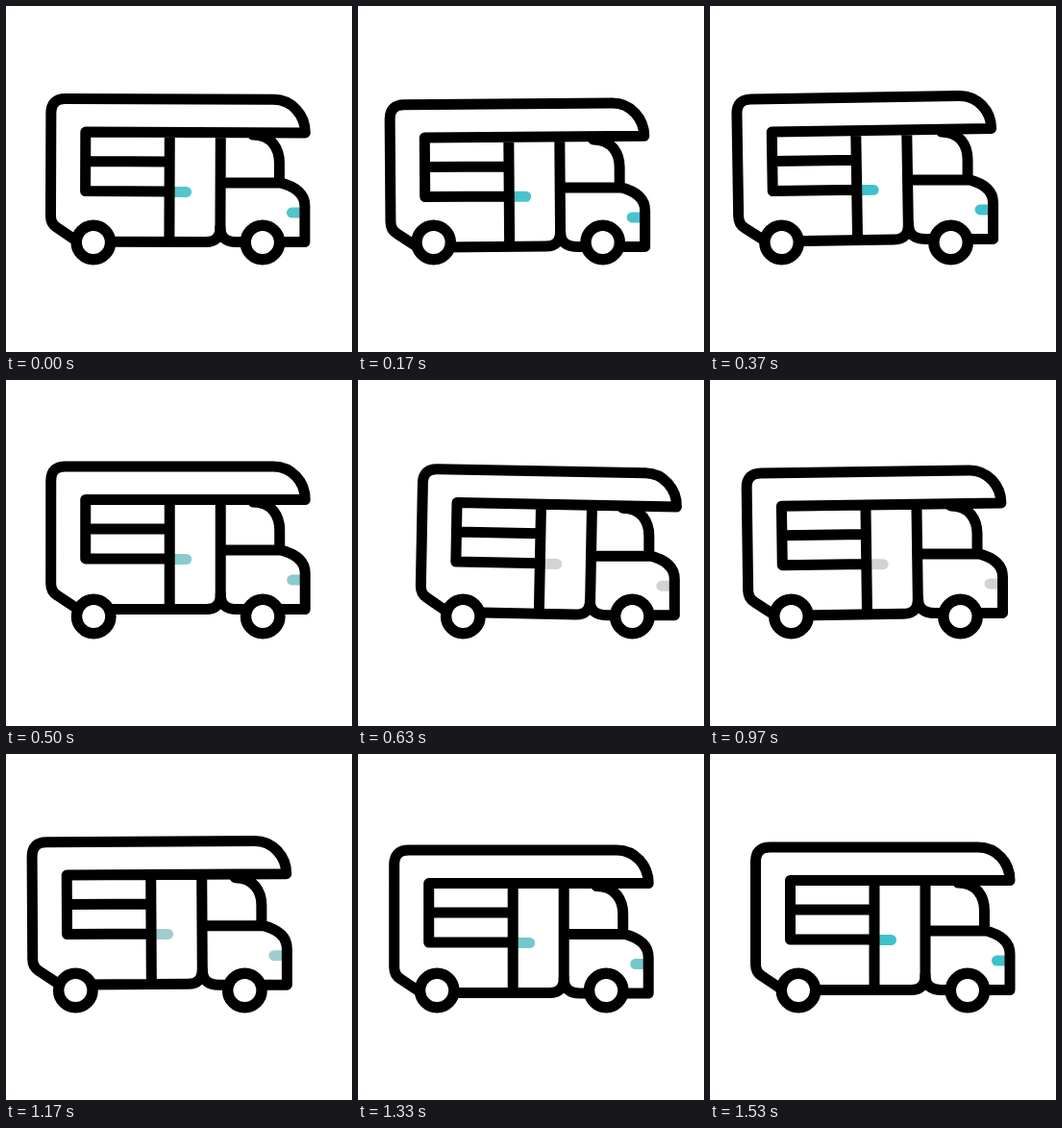
Write an HTML page that moves like this. It is 360 px wide and 360 px high and loops after 1.67 s.

```html
<!DOCTYPE html>
<html>
<head>
<meta charset="utf-8">
<style>
  html, body { margin: 0; height: 100%; overflow: hidden; background: #fff; }
  svg { display: block; width: 100%; height: 100%; }
  .line { fill: none; stroke: #000; stroke-width: 11; stroke-linecap: round; stroke-linejoin: round; }
  .lamp { fill: none; stroke-width: 11; stroke-linecap: round; }
  .wheel { fill: #fff; stroke: #000; stroke-width: 11.5; }
</style>
</head>
<body>
<svg viewBox="0 0 360 360">
  <g id="cab">
    <path class="lamp" d="M298.5 215H306"/>
    <path class="line" d="M258 134C278 134 285.5 149 285.5 163V183.500C300 187 312 194 312 208V245.500H241Q224 245.500 224 230M226 184H287"/>
  </g>
  <g id="body">
    <path class="lamp" d="M177 193.500H188.500"/>
    <path class="line" d="M72 243L54 231Q47.500 227 47.500 219V112Q47.500 97 62.500 97H279C298 97 312 113 312 131.500H83.500V193H171M84 162H171M171 132V245.500M100 245.500H209Q224 245.500 224 230V132"/>
  </g>
  <g id="wheels">
    <circle class="wheel" cx="92" cy="246" r="17.700"/>
    <circle class="wheel" cx="268" cy="246" r="17.700"/>
  </g>
</svg>
<script>
const LOOP = 1670, CAB_LEAD = 15;

// Keys are [time in ms, value].
const sway = [[-50, 0], [310, -20], [715, 22], [1120, -20.5], [1530, 0]];
const bounce = [[0, 0], [200, 5], [500, -7], [810, 6.5], [1100, -8], [1380, 4], [1530, 0]];
const tilt = [[0, 0.2], [330, -1], [700, 1.3], [1030, -1], [1260, 0]];
const glow = [[0, 0.85], [370, 1], [630, 0], [770, 0.55], [970, 0], [1170, 0.35], [1530, 1]];

const smooth = p => p * p * (3 - 2 * p);
const linear = p => p;
const mix = (a, b, p) => a + (b - a) * p;

function valueAt(keys, t, ease = smooth) {
  const i = keys.findIndex(key => key[0] > t);
  if (i < 0) return keys[keys.length - 1][1];
  if (i === 0) return keys[0][1];
  const [t0, a] = keys[i - 1], [t1, b] = keys[i];
  return mix(a, b, ease((t - t0) / (t1 - t0)));
}

const [cab, body, wheels] = ['cab', 'body', 'wheels'].map(id => document.getElementById(id));
const lamps = document.querySelectorAll('.lamp');
const grey = [211, 211, 211], teal = [62, 193, 203];

function draw(now) {
  const t = now % LOOP;
  const x = valueAt(sway, t);
  const move = (part, y, angle = 0) =>
    part.setAttribute('transform', `translate(${x} ${y}) rotate(${angle} 196 246)`);
  move(wheels, 0);
  move(cab, valueAt(bounce, t + CAB_LEAD));
  move(body, valueAt(bounce, t), valueAt(tilt, t));

  const lit = valueAt(glow, t, linear);
  const color = `rgb(${grey.map((c, i) => Math.round(mix(c, teal[i], lit)))})`;
  lamps.forEach(lamp => lamp.setAttribute('stroke', color));
  requestAnimationFrame(() => draw(performance.now() - start));
}

const start = performance.now();
draw(0);
</script>
</body>
</html>
```
